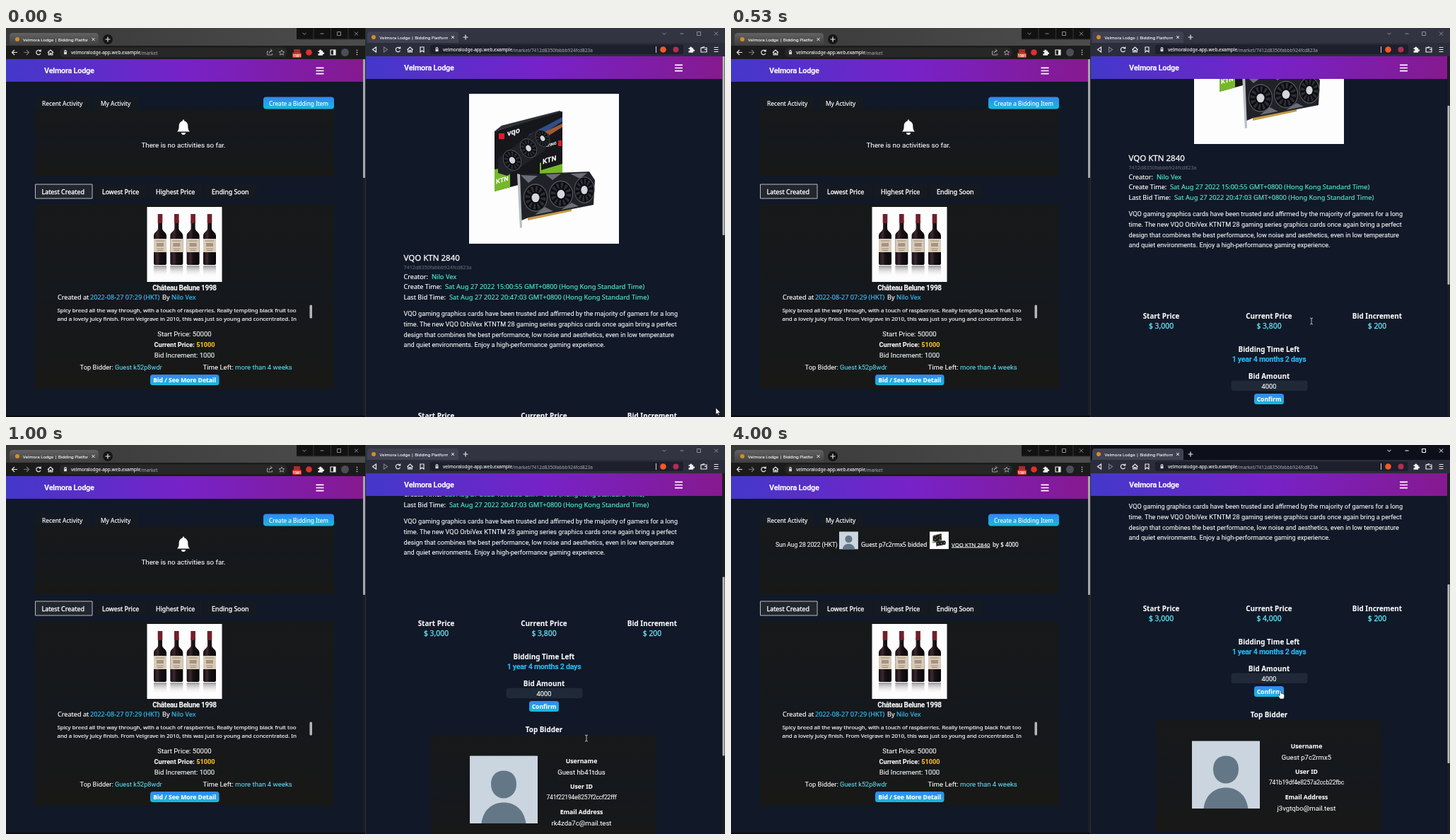
Animation of 1017x550 px, one loop 4.59 s. Source, as an HTML page:

```html
<!DOCTYPE html>
<html lang="en">
<head>
<meta charset="utf-8">
<title>Bidding demo</title>
<style>
@property --s { syntax: '<length>'; inherits: true; initial-value: 0px; }
html, body { margin: 0; width: 100%; height: 100%; overflow: hidden; background: #0a0b12; }
svg { display: block; color: #f8f9fa; }
#stage { width: 1017px; height: 550px; --s: 0px; }
text { font: 9.6px Roboto, sans-serif; dominant-baseline: central; white-space: pre; }
text, tspan { fill: currentColor; stroke: currentColor; stroke-width: .1px; }
.n { font-family: "Noto Sans", "Open Sans", sans-serif; font-size: 9.1px; stroke-width: .18px; }
.m { text-anchor: middle; }
.h { font: 700 9.9px "Noto Sans", "Open Sans", sans-serif; text-anchor: middle; }
.brand { font-size: 10.9px; font-weight: 600; letter-spacing: -.25px; }
.med { font-size: 8.9px; stroke-width: .35px; }
.ui { font: 6.5px "Noto Sans", sans-serif; }
.dim { color: #989ba4; }
.sky { color: #38bdf8; }
.cyan { color: #5bd8ec; }
.teal { color: #4ee6c5; font-size: 9.3px; }
.amber { color: #fbbf24; }
.desc { font-size: 9.15px; }
.blurb { font-size: 7.95px; }
.val { font: 500 10.4px "Noto Sans", sans-serif; color: #5ce3f2; text-anchor: middle; stroke-width: .3px; }
.id { font-size: 8.5px; letter-spacing: -.15px; text-anchor: middle; }
.line { fill: none; stroke: #e8e8ea; stroke-width: 1.2; }
.off { stroke: #777a86; }

#stage, .anim { animation: 4590ms step-end infinite; }
#stage { animation-name: scroll; }
#page { transform: translateY(calc(var(--s) * -1)); }
#thumb { transform: translateY(calc(var(--s) * .495)); }
#cursor { animation-name: move; }
#arrow { animation-name: arrow; }
#beam { animation-name: beam; }
#hand { animation-name: hand; }
#bar { animation-name: bar; }
#winBtns { animation-name: btns; }
.before { animation-name: before; }
.after { animation-name: after; }

@keyframes scroll {
  0% { --s: 0px } 8.71% { --s: 8.5px } 10.23% { --s: 74px } 11.54% { --s: 141px }
  13.07% { --s: 186px } 14.59% { --s: 210px } 15.9%, 17.42% { --s: 212px }
  18.95% { --s: 222px } 20.26% { --s: 264px } 21.78% { --s: 296px } 23.31% { --s: 309px }
  24.61% { --s: 315px } 26.14%, 100% { --s: 317px }
}
@keyframes move {
  0% { transform: translate(1004px, 537px) } 1.52% { transform: translate(998px, 532px) }
  2.83% { transform: translate(968px, 510px) } 4.35% { transform: translate(912px, 472px) }
  5.88% { transform: translate(856px, 434px) } 7.18% { transform: translate(826px, 417px) }
  8.71% { transform: translate(821px, 414px) } 24.61% { transform: translate(819px, 405px) }
  26.14% { transform: translate(812px, 382px) } 27.66% { transform: translate(801px, 360px) }
  28.97% { transform: translate(789px, 348px) } 30.5% { transform: translate(785px, 347px) }
  32.02% { transform: translate(779px, 347px) } 33.33%, 100% { transform: translate(777px, 347px) }
}
@keyframes arrow { 0% { opacity: 1 } 5.88% { opacity: 0 } 24.61% { opacity: 1 } 32.02%, 100% { opacity: 0 } }
@keyframes beam { 0% { opacity: 0 } 5.88% { opacity: 1 } 24.61%, 100% { opacity: 0 } }
@keyframes hand { 0% { opacity: 0 } 32.02%, 100% { opacity: 1 } }
@keyframes bar { 0% { fill: #323441 } 36.38%, 100% { fill: #0d0f1b } }
@keyframes btns { 0% { stroke: #8c8e98 } 36.38%, 100% { stroke: #fff } }
@keyframes before { 0% { opacity: 1 } 87.14%, 100% { opacity: 0 } }
@keyframes after { 0% { opacity: 0 } 87.14%, 100% { opacity: 1 } }
</style>
</head>
<body>
<svg id="stage" viewBox="0 0 1017 550" xmlns="http://www.w3.org/2000/svg">
<defs>
  <linearGradient id="head"><stop stop-color="#4338ca"/><stop offset=".5" stop-color="#7722c8"/><stop offset="1" stop-color="#86198f"/></linearGradient>
  <linearGradient id="btn" x2="0" y2="1"><stop stop-color="#3287f3"/><stop offset="1" stop-color="#14bbdc"/></linearGradient>
  <linearGradient id="panel" x2="0" y2="1"><stop stop-color="#171919"/><stop offset=".5" stop-color="#15181c"/><stop offset="1" stop-color="#181816"/></linearGradient>
  <linearGradient id="fade" x2="0" y2="1"><stop stop-color="#555" stop-opacity=".6"/><stop offset="1" stop-color="#fff" stop-opacity="0"/></linearGradient>
  <linearGradient id="strip"><stop stop-color="#383838"/><stop offset="1" stop-color="#4c4c4c"/></linearGradient>
  <linearGradient id="tab" x2="0" y2="1"><stop stop-color="#626262"/><stop offset="1" stop-color="#3c3c3c"/></linearGradient>
  <linearGradient id="glass"><stop stop-color="#120d12"/><stop offset=".3" stop-color="#3c292e"/><stop offset=".5" stop-color="#171014"/><stop offset="1" stop-color="#08070a"/></linearGradient>
  <clipPath id="view"><path d="M509 72h508v478H509z"/></clipPath>
  <clipPath id="tabL"><path d="M22 5h94v20H22z"/></clipPath>
  <clipPath id="tabR"><path d="M527 2h98v20h-98z"/></clipPath>
  <clipPath id="blurb"><path d="M70 390h350v26H70z"/></clipPath>

  <path id="winIcons" fill="none" d="M-2.5-1.2 0 1.3l2.5-2.5M22.5 0h5M46.5-2.5h5v5h-5zM71-2.5l5 5m0-5-5 5"/>
  <path id="back" class="line" d="M4 0h-7.5M0-3.5-3.5 0 0 3.5"/>
  <path id="reload" class="line" d="M3 1.3A3.2 3.2 0 1 1 2.4-2.2M3.2-4v2.4H.8"/>
  <path id="home" class="line" d="M-4 .3 0-3.5 4 .3M-2.8-.5v4h2V1h1.6v2.5h2v-4"/>
  <g id="lock"><path d="M-2-.7h4v3.4h-4z" fill="#d5d6da"/><path class="line" d="M-1.2-.8v-1a1.2 1.2 0 0 1 2.4 0v1"/></g>
  <path id="puzzle" fill="#f2f2f2" d="M-3.5-2.2h2a1.4 1.4 0 1 1 2.6 0h2v2.1a1.4 1.4 0 1 1 0 2.5v1.8h-6.6V1.6a1.3 1.3 0 1 0 0-2.2z"/>
  <path id="burger" class="line" style="stroke:#fff;stroke-width:1.7" d="M-5.5-4.2h11M-5.5 0h11M-5.5 4.2h11"/>
  <path id="close" class="line" style="stroke-width:1" d="m-2-2 4 4m0-4-4 4"/>

  <g id="avatar">
    <path fill="#cbd5df" d="M0 0h96v95.5H0z"/>
    <path fill="#647787" d="M48 21c12 0 18 8 18 19 0 12-8 20-18 20s-18-8-18-20c0-11 6-19 18-19zM16.5 95.5C19 76 32 66 48 66s29 10 31.500 29.500z"/>
  </g>

  <g id="bottle">
    <path fill="url(#glass)" d="M-3 9h6v11c0 5 6 5 6 11v39q0 2-2 2H-7q-2 0-2-2V31c0-6 6-6 6-11z"/>
    <path fill="#71202b" d="M-3.3 0h6.600v13h-6.600z"/>
    <path fill="#d8cbb8" d="M-9 35H9v19H-9z"/>
    <path stroke="#8d7968" stroke-width=".8" d="M-6 38H6M-5 49H5M-4 51.500h8"/>
    <path fill="#a8937e" d="M-5 41H5v5H-5z"/>
    <path fill="url(#fade)" d="M-9 73H9v16H-9z"/>
  </g>

  <g id="fan">
    <circle r="16.5" fill="#0b0c0f" stroke="#55585f" stroke-width="1.200"/>
    <circle r="11" fill="none" stroke="#2c2e34" stroke-width="7" stroke-dasharray="3 2.700"/>
    <circle r="5.500" fill="#d3d6da"/>
  </g>
  <g id="product">
    <path fill="#fdfdfd" d="M0 0h212v212H0z"/>
    <path fill="#2f3138" d="m36 53 10-8 82-21 4 2z"/>
    <path fill="#16171b" d="m36 53 96-28v87l-96 26z"/>
    <path fill="#2e4f87" d="m84 58 48-25v6L90 66z"/>
    <path fill="#a65a35" d="m86 64 46-22v5L92 72z"/>
    <path fill="#76b82a" d="m36 107 22-4v29l-22 6zM100 98l32-12v26l-32 9z"/>
    <path fill="#16171b" d="m102 88 30-9v20l-30 9z"/>
    <path fill="#d8202c" d="M42 56h8v8h-8zM126 66h5v8h-5z"/>
    <g transform="skewY(-16)" font-weight="700">
      <text x="54" y="72" style="font-size:11px;font-weight:700">vqo</text>
      <text x="101" y="105" style="font-size:5.500px;font-weight:700">PLAYING</text>
      <text x="104" y="126" style="font-size:10px;font-weight:700">KTN</text>
      <text x="38" y="135" style="font-size:9px;font-weight:700">KTN</text>
    </g>
    <path fill="#202228" d="m41 91 56-41 16 7-5 23-54 36-13-4z"/>
    <use href="#fan" transform="translate(61 94) rotate(-30) scale(.72 .9)"/>
    <use href="#fan" transform="translate(84 77) rotate(-30) scale(.65 .85)"/>
    <use href="#fan" transform="translate(104 63) rotate(-30) scale(.55 .75)"/>
    <path fill="#c49b48" d="m83 174 62-13v5l-62 13z"/>
    <path fill="#202227" d="m70 114 100-4 8 12-2 35-92 18-12 5z"/>
    <path fill="#6a6e76" d="m73 115 24 1-13 10zM108 114l22-1-12 9zM143 113l24-1-10 8zM93 171l14-11 12 6zM130 164l15-10 10 5z"/>
    <path fill="#b9bdc3" d="m68 113 4 1 3 75-3 1z"/>
    <use href="#fan" transform="translate(94 147) scale(1 1.15)"/>
    <use href="#fan" transform="translate(130 142) scale(1 1.12)"/>
    <use href="#fan" transform="translate(163 136) scale(.85 1.1)"/>
  </g>
</defs>

<path fill="#0a0b12" d="M0 0h1017v550H0z"/>

<!-- left window -->
<path fill="url(#strip)" d="M0 0h508v26H0z"/>
<path fill="#121212" d="M411 0h97v16h-97z"/>
<path stroke="#343434" d="M435 0v16M459.500 0v16M484 0v16M411 16h97" fill="none"/>
<use href="#winIcons" x="422" y="8" stroke="#8c8c8c"/>
<path fill="url(#tab)" d="M5 26V12q0-5 5-5h116q5 0 5 5v14z"/>
<circle cx="16" cy="16" r="3" fill="#d98a26"/>
<text class="ui" x="24" y="16" clip-path="url(#tabL)" style="font-size:6.100px">Velmora Lodge | Bidding Platform</text>
<use href="#close" x="123.500" y="16"/>
<circle cx="144" cy="16" r="7" fill="#151515"/>
<path class="line" d="M140.500 16h7M144 12.500v7"/>
<path fill="#1b1b1b" d="M0 25h508v19H0z"/>
<rect x="76" y="27.500" width="322" height="14" rx="7" fill="#272727"/>
<use href="#back" x="12" y="34.500"/>
<use href="#back" transform="translate(29 34.500) scale(-1 1)" opacity=".45"/>
<use href="#reload" x="46" y="34.500"/><use href="#home" x="63" y="34.500"/><use href="#lock" x="84" y="34.500"/>
<text class="ui" x="92" y="34.500">velmoralodge-app.web.example<tspan class="dim">/market</tspan></text>
<path class="line" style="stroke:#aaa;stroke-width:.9" d="M371 33h-1.500v5h7v-2M372 36q0-4 4-4m-2-2 2.500 2-2.500 2M390 31l1.100 2.500 2.700.2-2 1.800.6 2.700-2.400-1.500-2.400 1.500.6-2.700-2-1.800 2.700-.2z"/>
<path fill="#a92b2b" d="M407 30h9v6h-9z"/>
<rect x="405" y="35" width="13" height="7" rx="1.500" fill="#d9342b"/>
<text class="ui m" x="411.500" y="38.500" style="font-size:5px;font-weight:700">1581</text>
<circle cx="428.500" cy="34.500" r="4.300" fill="#e0302c"/>
<use href="#puzzle" x="445" y="34.500"/>
<path class="line" d="M459 31h7v7h-7z"/><path fill="#eee" d="M463 31h3v7h-3z"/>
<circle cx="479.500" cy="34.500" r="5.500" fill="#4b4e57"/>
<path stroke="#eee" stroke-width="1.600" stroke-linecap="round" d="M496.500 31.500h0M496.500 34.500h0M496.500 37.500h0"/>

<path fill="#111827" d="M0 44h505v504H0z"/>
<path fill="url(#head)" d="M0 44h505v32H0z"/>
<text class="brand" x="54" y="60.500">Velmora Lodge</text>
<use href="#burger" x="444" y="60.500"/>
<path fill="#1d1e22" d="M505 44h3v504h-3z"/>
<rect x="505" y="44" width="3" height="168" rx="1" fill="#a5a6a8"/>
<path fill="#2c2d33" d="M508 0h1v550h-1z"/>

<path fill="#151a21" d="M41 97h77v18H41zM124 97h63v18h-63zM126 221h73v20h-73zM202 221h76v20h-76zM281 221h74v20h-74z"/>
<text class="n" x="51" y="106" style="font-size:8.400px">Recent Activity</text>
<text class="n" x="134" y="106" style="font-size:8.400px">My Activity</text>
<rect x="364" y="97.500" width="100" height="17" rx="4" fill="url(#btn)"/>
<text class="n m" x="414" y="106" style="font-size:8.200px">Create a Bidding Item</text>
<path fill="url(#panel)" d="M41 115h423v95H41z"/>
<path fill="url(#panel)" d="M41 249h423v261H41z"/>

<g class="anim before">
  <path fill="#fff" d="M242 146.500c2.300-2 2.700-4.500 2.700-8.500 0-3.500 2.300-6 5.100-6.600v-.6a1.200 1.200 0 0 1 2.400 0v.6c2.800.6 5.100 3.100 5.100 6.600 0 4 .4 6.500 2.700 8.500zM248 148h6a3 3 0 0 1-6 0z"/>
  <text class="m" x="251" y="165" style="font-size:9.800px">There is no activities so far.</text>
</g>
<g class="anim after">
  <text x="63" y="140.500" style="font-size:8.600px;letter-spacing:-.1px">Sun Aug 28 2022 (HKT)</text>
  <use href="#avatar" transform="translate(153 122.500) scale(.28 .26)"/>
  <text class="n" x="184" y="140.500" style="font-size:8.300px">Guest p7c2rmx5 bidded</text>
  <use href="#product" transform="translate(281 122.500) scale(.127 .116)"/>
  <text class="n" x="312" y="140.500" style="font-size:7.900px" text-decoration="underline">VQO KTN 2840</text>
  <text class="n" x="370" y="140.500" style="font-size:8.200px">by $ 4000</text>
</g>

<path fill="#22272f" stroke="#b9bbbe" d="M41.500 221h80.500v20H41.500z"/>
<text class="n med" x="50.500" y="231">Latest Created</text>
<text class="n med" x="136" y="231">Lowest Price</text>
<text class="n med" x="212" y="231">Highest Price</text>
<text class="n med" x="291" y="231">Ending Soon</text>

<path fill="#fdfdfd" d="M199.500 253h106v106h-106z"/>
<use href="#bottle" x="218" y="263"/><use href="#bottle" x="241.300" y="263"/>
<use href="#bottle" x="264.600" y="263"/><use href="#bottle" x="288" y="263"/>
<text class="m" x="252.500" y="367" style="font-size:10px;font-weight:700;letter-spacing:-.3px">Château Belune 1998</text>
<text class="n" x="73" y="380.500">Created at</text>
<text class="n sky" x="119" y="380.500">2022-08-27 07:29 (HKT)</text>
<text class="n" x="221" y="380.500">By</text>
<text class="n sky" x="234" y="380.500">Nilo Vex</text>
<g clip-path="url(#blurb)">
  <text class="n blurb" x="72.500" y="398.500">Spicy breed all the way through, with a touch of raspberries. Really tempting black fruit too</text>
  <text class="n blurb" x="72.500" y="411">and a lovely juicy finish. From Velgrave in 2010, this was just so young and concentrated. In</text>
</g>
<rect x="429.500" y="391.500" width="3.500" height="19" rx="1.500" fill="#b5b6b8"/>
<text class="m" x="252.500" y="432.500">Start Price: 50000</text>
<text class="m" x="252.500" y="447" style="font-weight:700;font-size:9.200px">Current Price: <tspan class="amber">51000</tspan></text>
<text class="m" x="252.500" y="462">Bid Increment: 1000</text>
<text x="104.500" y="479" style="font-size:9.400px">Top Bidder:</text>
<text class="cyan" x="154" y="479" style="font-size:9.200px">Guest k52p8wdr</text>
<text x="278.500" y="479">Time Left:</text>
<text class="cyan" x="324" y="479">more than 4 weeks</text>
<rect x="204" y="490" width="97.500" height="15" rx="3.500" fill="url(#btn)"/>
<text class="n m" x="252.700" y="497.500" style="font-weight:700;font-size:8.600px">Bid / See More Detail</text>

<!-- right window -->
<path id="bar" class="anim" d="M509 0h508v22H509z"/>
<path fill="#404252" d="M511 22V9q0-4 4-4h121q4 0 4 4v13z"/>
<path fill="#2b2d3b" d="M509 21h508v19H509z"/>
<circle cx="520" cy="13" r="3" fill="#d98a26"/>
<text class="ui" x="528.500" y="13" clip-path="url(#tabR)" style="font-size:6.100px">Velmora Lodge | Bidding Platform</text>
<use href="#close" x="632" y="13"/>
<path class="line" d="M646.500 13h7M650 9.500v7"/>
<g id="winBtns" class="anim"><use href="#winIcons" x="931" y="8"/></g>
<rect x="600" y="23.500" width="358" height="13.500" rx="3" fill="#1d1f2c"/>
<path class="line" d="m523.500 27-5 3.500 5 3.500z"/>
<path class="line off" d="m534.500 27 5 3.500-5 3.500z"/>
<use href="#reload" x="554.500" y="30.500"/><use href="#home" x="571.500" y="30.500"/>
<path class="line" d="M586 27h5v7l-2.500-2-2.500 2z"/>
<use href="#lock" x="609.500" y="30.500"/>
<text class="ui" x="618" y="30.500">velmoralodge-app.web.example<tspan class="dim">/market/7412d8350fabbb924fcd823a</tspan></text>
<path stroke="#d5d6da" d="M919.500 26v9"/>
<circle cx="929.500" cy="30.500" r="4.300" fill="#f3592b"/>
<circle cx="947.500" cy="30.500" r="4" fill="#b12f52"/>
<use href="#puzzle" x="969" y="30.500"/>
<path class="line" d="M983 28h8v6h-8zM983 28l5-1.500M988 30.500h3"/>
<path class="line" d="M1001.500 27.500h6M1001.500 30.500h6M1001.500 33.500h6"/>

<path fill="#111827" d="M509 40h504v510H509z"/>
<path fill="#1c1d22" d="M1013 40h4v510h-4z"/>
<g clip-path="url(#view)"><g id="page">
  <use href="#product" x="655" y="93"/>
  <text class="n" x="562.500" y="324" style="font-size:11.500px;stroke-width:.3px">VQO KTN 2840</text>
  <text class="n" x="562.500" y="338" style="font-size:7.200px;color:#586170">7412d8350fabbb924fcd823a</text>
  <text class="n" x="562.500" y="351">Creator:</text>
  <text class="n teal" x="602" y="351">Nilo Vex</text>
  <text class="n" x="562.500" y="365.500">Create Time:</text>
  <text class="n teal" x="621" y="365.500">Sat Aug 27 2022 15:00:55 GMT+0800 (Hong Kong Standard Time)</text>
  <text class="n" x="562.500" y="380.500">Last Bid Time:</text>
  <text class="n teal" x="627" y="380.500">Sat Aug 27 2022 20:47:03 GMT+0800 (Hong Kong Standard Time)</text>
  <text class="desc" x="562.500" y="404">VQO gaming graphics cards have been trusted and affirmed by the majority of gamers for a long</text>
  <text class="desc" x="562.500" y="418.500">time. The new VQO OrbiVex KTNTM 28 gaming series graphics cards once again bring a perfect</text>
  <text class="desc" x="562.500" y="433.500">design that combines the best performance, low noise and aesthetics, even in low temperature</text>
  <text class="desc" x="562.500" y="448">and quiet environments. Enjoy a high-performance gaming experience.</text>

  <text class="h" x="608.500" y="547.500">Start Price</text>
  <text class="h" x="761" y="547.500">Current Price</text>
  <text class="h" x="914" y="547.500">Bid Increment</text>
  <text class="val" x="608.500" y="562">$ 3,000</text>
  <text class="val anim before" x="761" y="562">$ 3,800</text>
  <text class="val anim after" x="761" y="562">$ 4,000</text>
  <text class="val" x="914" y="562">$ 200</text>

  <text class="h" x="761" y="594.500">Bidding Time Left</text>
  <text class="m" x="761" y="609" style="font-size:10.700px;font-weight:600;letter-spacing:-.3px;color:#27b9f2">1 year 4 months 2 days</text>
  <text class="h" x="761" y="632.500">Bid Amount</text>
  <rect x="707.500" y="639.500" width="108" height="14.500" rx="3.500" fill="#1f2937"/>
  <text class="n m" x="761" y="647">4000</text>
  <rect x="740" y="658" width="42" height="15" rx="3.500" fill="url(#btn)"/>
  <text class="h" x="761" y="665.500" style="font-size:8.600px">Confirm</text>
  <text class="h" x="761" y="698">Top Bidder</text>
  <path fill="url(#panel)" d="M601 706h319v157H601z"/>
  <text class="h" x="814" y="743" style="font-size:8.700px">Username</text>
  <text class="h" x="814" y="779" style="font-size:8.700px">User ID</text>
  <text class="h" x="814" y="815" style="font-size:8.700px">Email Address</text>
  <g class="anim before">
    <use href="#avatar" x="656" y="735.500"/>
    <text class="m" x="814" y="758">Guest hb41tdus</text>
    <text class="id" x="814" y="794">741f22194e8257f2ccf22fff</text>
    <text class="m" x="814" y="830">rk4zda7c@mail.test</text>
  </g>
  <g class="anim after">
    <use href="#avatar" x="652" y="735.500"/>
    <text class="m" x="814" y="758">Guest p7c2rmx5</text>
    <text class="id" x="814" y="794">741b19df4e8257a2ccb22fbc</text>
    <text class="m" x="814" y="830">j3vgtqbo@mail.test</text>
  </g>
</g></g>
<path fill="url(#head)" d="M509 40h504v32H509z"/>
<text class="brand" x="563" y="56">Velmora Lodge</text>
<use href="#burger" x="951.500" y="56.500"/>
<rect id="thumb" x="1013.500" y="40" width="3" height="253" rx="1" fill="#b9babd"/>

<g id="cursor" class="anim">
  <path id="arrow" class="anim" fill="#fff" stroke="#111" stroke-width=".6" d="M0 0v9.500l2.200-2 1.500 3.300 1.400-.6-1.500-3.300h3z"/>
  <path id="beam" class="anim line" style="stroke:#c9ccd2;stroke-width:.9" d="M-2-4q2 0 2 1.200 0-1.200 2-1.200M0-3v7M-2 5q2 0 2-1.200Q0 5 2 5"/>
  <path id="hand" class="anim" fill="#fff" stroke="#111" stroke-width=".6" d="M-1 .8a1 1 0 0 1 2 0v3.400q1.500-.7 1.800.5 1.300-.5 1.600.6 1.200-.2 1.200 1v2.400q0 1.800-1.100 3.300H-.3L-3.200 7.600q-.4-1.200.7-1.300L-1 7.600z"/>
</g>
</svg>
</body>
</html>
```
